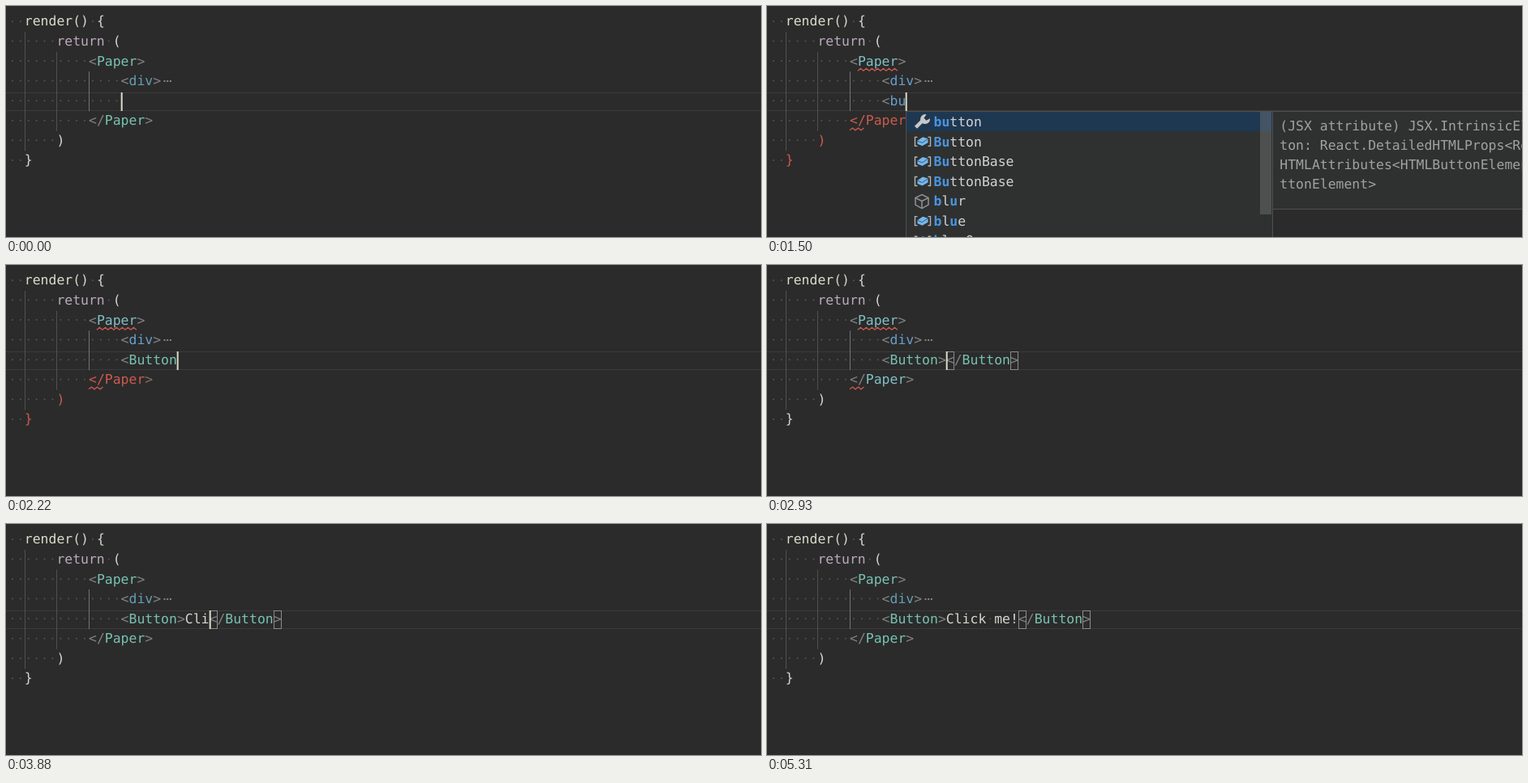
These frames come from a looping animation (931 px wide and 286 px high, 5390 ms). An HTML page:

```html
<!DOCTYPE html>
<html lang="en">
<head>
<meta charset="utf-8">
<title>Typing a JSX tag</title>
<style>
  html, body { margin: 0; width: 100%; height: 100%; overflow: hidden; background: #2b2b2b; }
  svg { display: block; width: 931px; height: 286px; }
  text { font: 16.44px "DejaVu Sans Mono", monospace; white-space: pre; text-rendering: geometricPrecision; }
  .bold { font-weight: bold; }
  .abc { font: 9.5px "DejaVu Sans", sans-serif; }
</style>
</head>
<body>
<svg id="stage" viewBox="0 0 931 286"></svg>
<script>
const LOOP = 5390, PITCH = 9.9, LINE = 24.57;
const GREY = '#828282', LIGHT = '#d6d6d0', RED = '#cb5a4e', TEAL = '#78c2b0', MATCH = '#4a94e0';
const stage = document.getElementById('stage');

const typed = [
  [0, ''], [630, '<'], [1260, '<b'], [1420, '<bu'], [1980, '<Button'], [2540, '<Button>'],
  [3480, '<Button>C'], [3560, '<Button>Cl'], [3800, '<Button>Cli'], [3960, '<Button>Clic'],
  [4040, '<Button>Click'], [4200, '<Button>Click '], [4360, '<Button>Click m'],
  [4520, '<Button>Click me'], [4760, '<Button>Click me!']
];
const menus = [
  [0, null], [790, 'globals'], [1260, null], [1340, 'tags'], [1740, 'second'], [1980, null],
  [3640, 'class'], [3800, null], [4520, 'me'], [4760, null]
];

const tags = [
  ['wrench', 'button'], ['value', 'Button'], ['value', 'ButtonBase'], ['value', 'ButtonBase'],
  ['cube', 'blur'], ['value', 'blue'], ['value', 'blurOn']
];
const menuData = {
  globals: {
    items: ['AbortController', 'AbortSignal', 'AbstractRange', 'ActiveXObject', 'AnalyserNode',
      'Animation', 'AnimationEffect'].map(name => ['value', name]),
    sel: 0, thumb: 28,
    info: ['interface AbortController', 'var AbortController: {', 'new (): AbortController;',
      'prototype: AbortController;', '}']
  },
  tags: {
    items: tags, sel: 0, thumb: 127,
    info: ['(JSX attribute) JSX.IntrinsicElements', 'ton: React.DetailedHTMLProps<React.Bu',
      'HTMLAttributes<HTMLButtonElement>, HT', 'ttonElement>']
  },
  second: {
    items: tags, sel: 1, thumb: 127,
    info: ['Auto import from', "'@material-ui/core'", 'const Button: React.ComponentType', '<ButtonProps>']
  },
  class: { items: [['abc', 'class'], ['abc', 'className']], sel: 0 },
  me: { items: [['abc', 'me'], ['abc', 'material']], sel: 0 }
};

const colX = col => 3 + col * PITCH;
const base = row => 24.4 + row * LINE;
const rowTop = row => 7.4 + row * LINE;
const latest = (table, t) => table.filter(step => step[0] <= t).pop();
const esc = s => s.replace(/&/g, '&amp;').replace(/</g, '&lt;');
const label = (x, y, s, fill, cls = '') => `<text x="${x}" y="${y}" fill="${fill}" class="${cls}">${esc(s)}</text>`;
const rect = (x, y, w, h, fill, stroke = 'none') =>
  `<rect x="${x}" y="${y}" width="${w}" height="${h}" fill="${fill}" stroke="${stroke}"/>`;
const path = (d, stroke, width = 1, fill = 'none') =>
  `<path d="${d}" stroke="${stroke}" stroke-width="${width}" fill="${fill}"/>`;
const dot = (col, row) => `<circle cx="${colX(col + .5)}" cy="${base(row) - 5.5}" r="1" fill="#555"/>`;

// Writes coloured runs from a column, with a dot for every space.
function code(row, col, ...runs) {
  let out = '';
  for (let c = 0; c < col; c++) out += dot(c, row);
  for (const [s, fill] of runs) {
    out += label(colX(col), base(row), s, fill);
    [...s].forEach((ch, i) => { if (ch === ' ') out += dot(col + i, row); });
    col += s.length;
  }
  return out;
}

function squiggle(col, count, row) {
  const y = base(row) + 5.2, end = colX(col + count);
  let d = `M${colX(col)} ${y + 1.4}`;
  for (let x = colX(col) + 3.5, up = true; x < end; x += 3.5, up = !up) d += `L${x} ${y + (up ? -1.4 : 1.4)}`;
  return path(d, RED, 1.3);
}

const icons = {
  value: path('M14 -5.5H11V5.5H14M27 -5.5H30V5.5H27', '#b4b4b4', 1.4) +
    path('M14 -1L20.5 -5.5L27 -3.5V1.5L20 5.5L14 3Z', 'none', 0, '#78b6ea') +
    path('M14.5 -.5L20 1.5L26.5 -3', '#2c5c88', 1),
  wrench: path('M12 7L21 -2', '#c8c8c8', 4.4) +
    path('M25 -9A6 6 0 1 0 29.5 -4L25 -1.5L22 -4.5Z', 'none', 0, '#c8c8c8'),
  cube: path('M19.5 -8L27.5 -4V4.5L19.5 9L11.5 4.5V-4ZM11.5 -4L19.5 0L27.5 -4M19.5 0V9', '#8f8b93', 1.6),
  abc: rect(10.5, -8, 18, 16, '#2b2b2b', '#bcbcbc') + label(11.3, 3, 'abc', '#c8c8c8', 'abc')
};

// Marks the letters of the query where they occur in order.
function matched(x, y, name, query) {
  let out = '', hit = 0;
  const runs = [];
  [...name].forEach((ch, i) => {
    const on = hit < query.length && ch.toLowerCase() === query[hit].toLowerCase();
    if (on) hit++;
    const last = runs[runs.length - 1];
    if (last && last.on === on) last.s += ch;
    else runs.push({ s: ch, on, i });
  });
  for (const r of runs) out += label(x + r.i * PITCH, y, r.s, r.on ? MATCH : '#d2d2d2', r.on ? 'bold' : '');
  return out;
}

function menu({ items, sel, thumb, info }, x, query) {
  const top = 130.5, width = info ? 452 : 588.5, height = info ? 170 : 48;
  let out = rect(x, top, width, height, info ? '#2e3130' : '#2b2d2d', '#505050');
  out += rect(x + .5, top + .5 + sel * LINE, width - 1, LINE - .3, '#1f3852');
  items.forEach(([icon, name], i) => {
    const y = 143.3 + i * LINE;
    out += `<g transform="translate(${x} ${y})">${icons[icon]}</g>` + matched(x + 34, y + 5.7, name, query);
  });
  if (!info) return out;
  out += rect(x + width - 15.5, top + .5, 14, thumb, 'rgba(128, 128, 128, .38)');
  out += rect(x + width, top, 931 - x, info.length * 22.5 + 31, '#2f3130', '#505050');
  info.forEach((s, i) => out += label(x + width + 8.8, 154.2 + i * 24, s, '#a0a2a0'));
  return out;
}

function draw({ text, open, caret, closed, red, wavy }) {
  const paper = wavy ? '#80bfc6' : TEAL;
  const div = wavy ? '#679fce' : '#639fb4';
  const after = red ? RED : LIGHT;
  const end = 14 + text.length;
  let out = rect(0, 0, 931, 286, '#2b2b2b');
  out += rect(0, 107, 931, 1, '#3b3b3b') + rect(0, 129, 931, 1, '#3b3b3b');
  [[2, 1, 7, '#505050'], [6, 2, 6, '#505050'], [10, 3, 5, '#747474']].forEach(([col, from, to, fill]) =>
    out += rect(Math.round(colX(col)), rowTop(from), 1, (to - from) * LINE, fill));

  out += code(0, 2, ['render', '#dcdccb'], ['() {', LIGHT]);
  out += code(1, 6, ['return', '#baaabc'], [' (', LIGHT]);
  out += code(2, 10, ['<', GREY], ['Paper', paper], ['>', GREY]);
  out += code(3, 14, ['<', GREY], ['div', div], ['>', GREY]);
  for (let i = 0; i < 3; i++) out += rect(194.5 + i * 3.7, 92, 2, 2, '#858585');

  const name = (text.match(/^<(\w+)/) || ['', ''])[1];
  const runs = [];
  if (text) runs.push(['<', name ? GREY : '#c8c8c8']);
  if (name) runs.push([name, name === 'Button' ? TEAL : '#679fce']);
  if (text.includes('>')) runs.push(['>', GREY], [text.split('>')[1], LIGHT]);
  if (closed) runs.push(['</', GREY], ['Button', TEAL], ['>', GREY]);
  out += code(4, 14, ...runs);

  out += code(5, 10, ['</', red ? RED : GREY], ['Paper', red ? RED : paper], ['>', red ? '#8c6a62' : GREY]);
  out += code(6, 6, [')', after]) + code(7, 2, ['}', after]);
  if (wavy) out += squiggle(11, 5, 2) + squiggle(10, 2, 5);
  if (closed) [end, end + 8].forEach(c =>
    out += rect(Math.round(colX(c)) + .5, 107.5, 9, 22, 'none', '#8b8b8b'));
  if (caret) out += rect(Math.round(colX(end)) - .3, 107, 2, 23, '#d9d9c8');
  if (open) out += menu(menuData[open], Math.round(colX(end)) + .5, text.split(/[<> ]/).pop());
  stage.innerHTML = out;
}

let shown = '';
function tick() {
  const t = performance.now() % LOOP;
  const [since, text] = latest(typed, t);
  const state = {
    text,
    open: latest(menus, t)[1],
    caret: (t - since) % 1000 < 500,
    closed: t >= 2850,
    red: t >= 1340 && t < 2540,
    wavy: t >= 940 && t < 3080
  };
  const key = JSON.stringify(state);
  if (key !== shown) draw(state);
  shown = key;
  requestAnimationFrame(tick);
}
tick();
</script>
</body>
</html>
```
